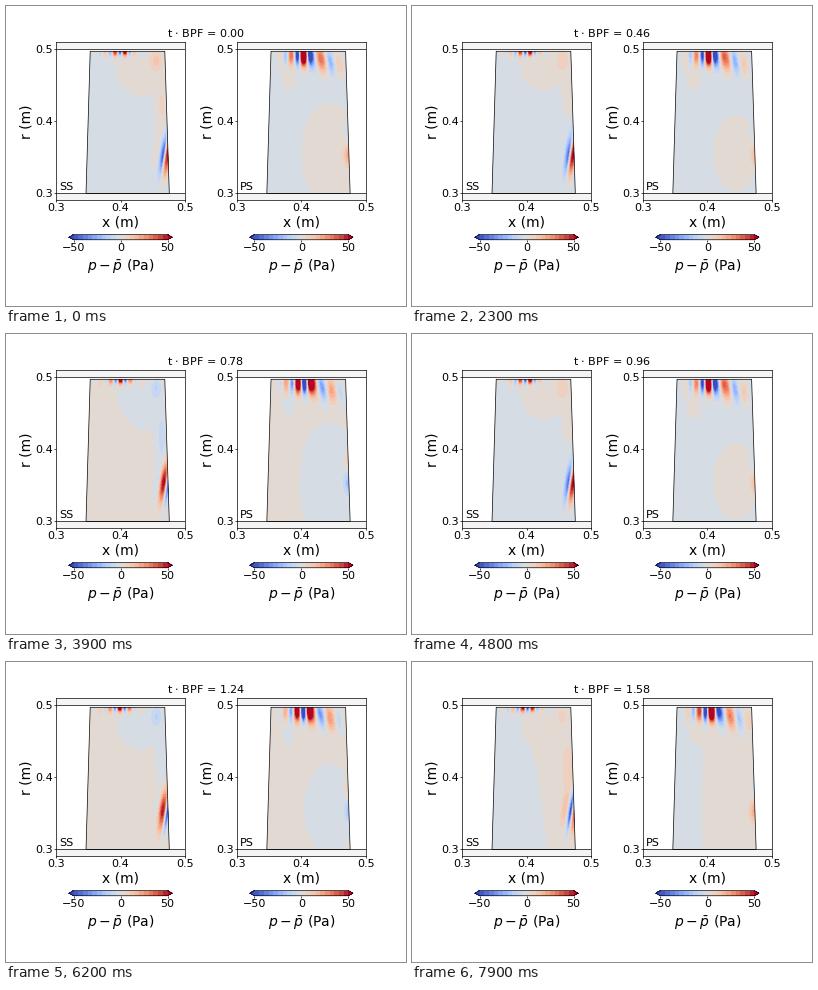
These frames come from a looping animation (400 px wide and 300 px high, 8 s). A matplotlib script:

```python
import numpy as np
import matplotlib.pyplot as plt
from matplotlib.animation import FuncAnimation
from matplotlib.cm import ScalarMappable
from matplotlib.colors import Normalize
from matplotlib.patches import Polygon

W, H, DPI = 400, 300, 100
FRAMES, INTERVAL = 80, 100
DT, PERIOD = 0.02, 0.5
LEVELS = np.arange(-50, 51, 5)
CMAP = plt.get_cmap("coolwarm")
NORM = Normalize(-50, 50)

# Panel layout in pixels.
LEFT, TOP, WIDTH, HEIGHT = 50, 36, 129.17, 158.4
GAP = 180.83

plt.rcParams.update({
    "font.family": "DejaVu Sans", "font.size": 8,
    "mathtext.fontset": "dejavusans", "axes.linewidth": 0.5,
    "xtick.major.width": 0.5, "ytick.major.width": 0.5,
    "xtick.major.size": 1.2, "ytick.major.size": 1.2,
    "xtick.major.pad": 1, "ytick.major.pad": 1,
})

# Pressure modes live on a pixel grid covering one blade.
X, Y = np.meshgrid(np.arange(78, 166, 0.75), np.arange(44, 189, 0.75))


def rot(deg):
    return np.exp(1j * np.radians(deg))


def blob(x, y, sx, sy, tilt=0.0):
    dx, dy = X - x - tilt * (Y - y), Y - y
    return np.exp(-0.5 * ((dx / sx) ** 2 + (dy / sy) ** 2))


def step(v, width):
    return 0.5 * (1 + np.tanh(v / width))


def suction_mode():
    z = 2.8 * rot(200) * np.ones_like(X)
    z += 5 * rot(18) * blob(129, 67, 17, 17, 0.2)
    z += 3.2 * rot(70) * step(X - 124 - 0.12 * (Y - 120), 8) * step(Y - 85, 15)
    z += 13 * rot(5) * blob(150.5, 54, 4.5, 8)
    edge = 9 * blob(156, 103, 4, 18)
    z += edge * rot(np.clip((Y - 60) * 0.9, 0, 90))
    # The trailing-edge wave shortens as it nears the edge.
    s = X - 156.5 + 0.15 * (Y - 149)
    wake = 360 * np.where(s < 0, s / 19, s / 11.5)
    z += 58 * blob(159.5, 149, 4.6, 13, -0.1) * rot(180 + wake)
    tip = 360 * (X - 119) / 10
    z += 55 * blob(116, 45, 7, 2.8) * rot(tip)
    z += 15 * blob(108, 46, 11, 4) * rot(tip)
    return z


def pressure_mode():
    z = 2.8 * rot(198) * np.ones_like(X)
    z += 4.8 * rot(8) * blob(143, 147, 18, 31)
    z += 2.6 * rot(60) * step(X - 108, 6)
    z += 4.5 * rot(5) * blob(101, 70, 6, 12)
    z += 22 * rot(25) * blob(162, 149, 3, 7)
    z += 8 * rot(200) * blob(161, 127, 2.5, 6)
    # Tip waves stretch as they convect downstream.
    xs = X - 0.12 * (Y - 47) * step(X - 122, 8)
    wave = np.interp(xs, [78, 92, 104, 110, 116.5, 123, 134, 152, 170],
                     [-1000, -740, -360, -187, 0, 173, 360, 720, 1080])
    z += 88 * blob(117, 49, 7.5, 6.5) * rot(wave)
    depth = 50 + 0.28 * np.clip(X - 120, 0, 40)
    tail = np.exp(-0.5 * (((X - 134) / 13) ** 2 + ((Y - depth) / 8) ** 2))
    z += 30 * tail * rot(wave)
    z += 14 * blob(101, 49, 7, 7) * rot(wave)
    return z


fig = plt.figure(figsize=(W / DPI, H / DPI), dpi=DPI, facecolor="white")


def place(x, y, w, h):
    return fig.add_axes([x / W, 1 - (y + h) / H, w / W, h / H])


def to_data(x, y):
    return 0.3 + 0.2 * (x - LEFT) / WIDTH, 0.51 - 0.22 * (y - TOP) / HEIGHT


def label(x, y, s, size, ha="center", va="center", **kw):
    return fig.text(x / W, 1 - y / H, s, fontsize=size, ha=ha, va=va, **kw)


def make_panel(dx, name):
    ax = place(LEFT + dx, TOP, WIDTH, HEIGHT)
    ax.set(xlim=(0.3, 0.5), ylim=(0.29, 0.51),
           xticks=[0.3, 0.4, 0.5], yticks=[0.3, 0.4, 0.5])
    for lo, hi, wall in ((0.5, 0.51, 0.5), (0.29, 0.3, 0.3)):
        ax.axhspan(lo, hi, color="#f4f4f4", lw=0, zorder=0)
        ax.axhline(wall, color="black", lw=0.5, zorder=3)
    corners = [to_data(*p) for p in ((80, 187.4), (84.2, 45.3), (158.8, 45.3), (163.3, 187.4))]
    blade = Polygon(corners, fill=False, ec="black", lw=0.5, zorder=4)
    ax.add_patch(blade)

    mid = LEFT + WIDTH / 2 + dx
    label(53.4 + dx, 184.3, name, 8, ha="left", va="baseline")
    label(mid, 216.5, "x (m)", 10)
    label(20.4 + dx, 115.5, "r (m)", 10, rotation=90)
    label(mid, 260, r"$p - \bar{p}$ (Pa)", 10)

    length = 0.8 * WIDTH
    cax = place(mid - length / 2, 228.6, length, length / 20)
    bar = fig.colorbar(ScalarMappable(NORM, CMAP), cax=cax, orientation="horizontal",
                       boundaries=LEVELS, extend="both", ticks=[-50, 0, 50])
    bar.outline.set_linewidth(0.5)
    bar.ax.minorticks_off()
    return ax, blade


panels = [(*make_panel(0, "SS"), suction_mode()),
          (*make_panel(GAP, "PS"), pressure_mode())]
title = label(200, 31, "", 8, va="baseline")
GX, GY = to_data(X, Y)
contours = []


def update(i):
    t = i * DT
    title.set_text(rf"t $\cdot$ BPF = {t:.2f}")
    while contours:
        contours.pop().remove()
    for ax, blade, mode in panels:
        p = np.real(mode * np.exp(-2j * np.pi * t / PERIOD))
        cs = ax.contourf(GX, GY, p, LEVELS, cmap=CMAP, norm=NORM,
                         extend="both", zorder=1)
        cs.set_clip_path(blade)
        contours.append(cs)
    return [title, *contours]


anim = FuncAnimation(fig, update, frames=FRAMES, interval=INTERVAL,
                     init_func=lambda: [title], repeat=True, repeat_delay=0)
plt.show()
```
